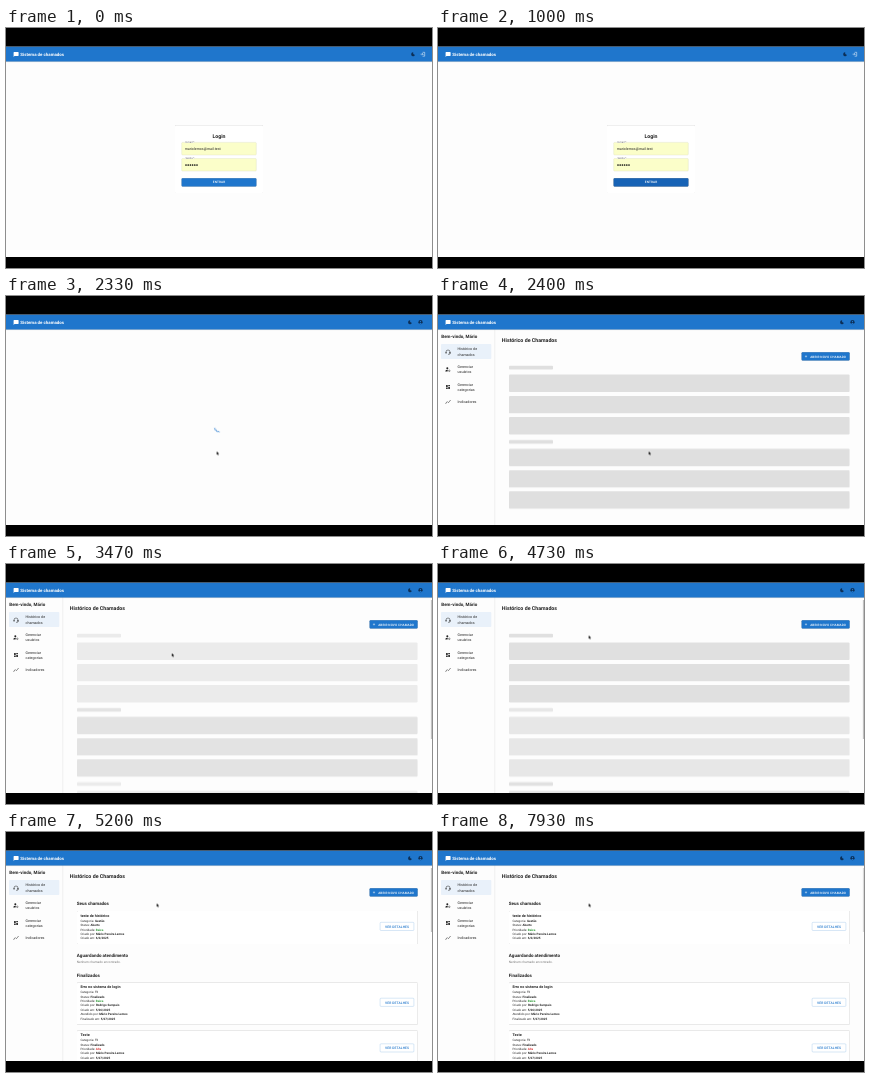
An HTML page that plays this animation: 426 by 240 pixels, repeating every 8000 ms.

```html
<!DOCTYPE html>
<html lang="pt-BR">
<head>
<meta charset="utf-8">
<title>Sistema de chamados</title>
<style>
html, body { margin: 0; width: 100%; height: 100%; overflow: hidden; background: #000; }
svg { display: block; width: 100vw; height: 100vh; font-family: Roboto, Arial, sans-serif; text-rendering: geometricPrecision; }
text { fill: #222; white-space: pre; }
.b { font-weight: 700; }
.m { font-weight: 500; letter-spacing: .0286em; }
.mid { text-anchor: middle; }
.white { fill: #fff; }
.blue { fill: #1f76cc; }
.grey { fill: #666; }
.nav text { font-size: 3.65px; }
.h6 { font-size: 4.5px; font-weight: 700; }
.line { font-size: 3.04px; }
.card { fill: #fff; filter: drop-shadow(0 .25px .4px #0005); }
.raised { filter: drop-shadow(0 .4px .4px #0006); }
.field { fill: #fbfec9; stroke: #d3d5b8; stroke-width: .3; }
.icon { fill: #222; }
.bone { fill: #000; fill-opacity: .118; }

/* One 8 s timeline: 1% = 80 ms */
.login, .logged, .wait, .home, .bones, .extra, .last, .list, .pulse, .late,
.hover, .ripple, .spin, .dash, .cursor, .bar, .thumb { animation: 8s infinite step-end; }
.login { animation-name: login; }
.logged { animation-name: logged; }
.wait { animation-name: wait; }
.home { animation-name: home; }
.bones { animation-name: bones; }
.extra { animation-name: extra; }
.last { animation-name: last; }
.list { animation-name: list; }
.pulse { animation-name: pulse; animation-timing-function: ease-in-out; }
.late { animation-name: late; animation-timing-function: ease-in-out; }
.hover { animation-name: hover; animation-timing-function: linear; }
.ripple { animation-name: ripple; animation-timing-function: ease-out; }
.spin { animation-name: spin; animation-timing-function: linear; }
.dash { animation-name: dash; animation-timing-function: ease-in-out; }
.cursor { animation-name: cursor; animation-timing-function: ease-in-out; }
.bar { animation-name: bar; animation-timing-function: linear; }
.thumb { animation-name: thumb; }

@keyframes login { 0% { visibility: visible } 25.75%, 100% { visibility: hidden } }
@keyframes logged { 0% { visibility: hidden } 25.75%, 100% { visibility: visible } }
@keyframes wait { 0% { visibility: hidden } 25.75% { visibility: visible } 30%, 100% { visibility: hidden } }
@keyframes home { 0% { visibility: hidden } 30%, 100% { visibility: visible } }
@keyframes bones { 0% { visibility: hidden } 30% { visibility: visible } 63.375%, 100% { visibility: hidden } }
@keyframes extra { 0% { visibility: hidden } 33.375% { visibility: visible } 63.375%, 100% { visibility: hidden } }
@keyframes last { 0% { transform: translateY(74.2px) } 33.375%, 100% { transform: translateY(148.4px) } }
@keyframes list { 0% { visibility: hidden } 63.375%, 100% { visibility: visible } }
@keyframes pulse { 0%, 36.25% { opacity: 1 } 48.75% { opacity: .4 } 61.25%, 100% { opacity: 1 } }
@keyframes late { 0%, 39.625% { opacity: 1 } 52.125% { opacity: .4 } 64.625%, 100% { opacity: 1 } }
@keyframes hover {
  0%, 11% { fill: #1f76cc; filter: drop-shadow(0 .3px .3px #0006) }
  12.5%, 100% { fill: #1763b6; filter: drop-shadow(0 .6px .7px #0008) }
}
@keyframes ripple {
  0%, 23.3% { transform: scale(0); opacity: 0 }
  23.375% { transform: scale(0); opacity: .1 }
  30.25%, 100% { transform: scale(1); opacity: .3 }
}
@keyframes spin { 0%, 25.75% { transform: rotate(0) } 43.25%, 100% { transform: rotate(360deg) } }
@keyframes dash {
  0%, 25.75% { stroke-dasharray: 1px, 200px; stroke-dashoffset: 0 }
  34.5%, 100% { stroke-dasharray: 100px, 200px; stroke-dashoffset: -15px }
}
@keyframes cursor {
  0%, 31.6% { transform: translate(210.6px, 155.5px); animation-timing-function: ease-in }
  33.375% { transform: translate(207px, 129px); animation-timing-function: ease-out }
  38.375%, 41.7% { transform: translate(168px, 92px) }
  48.375%, 100% { transform: translate(150.6px, 71.5px) }
}
@keyframes bar { 0%, 33.375% { opacity: 0 } 38%, 99% { opacity: 1 } 99.125%, 100% { opacity: .6 } }
@keyframes thumb { 0% { transform: scaleY(139) } 63.375%, 100% { transform: scaleY(64) } }
</style>
</head>
<body>
<svg viewBox="0 0 426 240" preserveAspectRatio="none">
  <defs>
    <linearGradient id="fade" x2="0" y2="1">
      <stop stop-color="#000" stop-opacity=".3"/><stop offset="1" stop-color="#000" stop-opacity="0"/>
    </linearGradient>
    <clipPath id="btn"><rect x="175.6" y="150.2" width="74.8" height="8.3" rx=".9"/></clipPath>
    <g id="moon"><path d="M.3-1.9A1.9 1.9 0 1 0 1.9.4 1.6 1.6 0 0 1 .3-1.9Z" fill="#0c2f57"/></g>
    <g id="group" class="bone">
      <rect x="71" y="69.8" width="44" height="3.7" rx=".8"/>
      <rect x="71" y="78.6" width="340.6" height="17.4" rx=".9"/>
      <rect x="71" y="99.9" width="340.6" height="17.4" rx=".9"/>
      <rect x="71" y="121.1" width="340.6" height="17.4" rx=".9"/>
    </g>
  </defs>

  <rect width="426" height="240" fill="#fdfdfd"/>

  <g class="login">
    <rect class="card" x="169" y="97.3" width="88" height="67.8" rx=".9"/>
    <text class="b mid" x="213" y="109.6" font-size="5.2">Login</text>
    <rect class="field" x="175.7" y="114.4" width="74.6" height="12.6" rx=".9"/>
    <rect class="field" x="175.7" y="130.5" width="74.6" height="12.6" rx=".9"/>
    <rect class="white" x="178.9" y="114" width="8.6" height=".8"/>
    <rect class="white" x="178.9" y="130.1" width="9" height=".8"/>
    <text class="grey" x="179.4" y="115.3" font-size="2.6">E-mail *</text>
    <text class="grey" x="179.4" y="131.4" font-size="2.6">Senha *</text>
    <text x="178.7" y="122.1" font-size="3.58">mariolemos@mail.test</text>
    <path d="M180 137H191.4" stroke="#111" stroke-width="1.7" stroke-linecap="round" stroke-dasharray="0 2.2"/>
    <rect class="hover" x="175.6" y="150.2" width="74.8" height="8.3" rx=".9"/>
    <g clip-path="url(#btn)"><g transform="translate(211 156)"><circle class="ripple white" r="42"/></g></g>
    <text class="m mid white" x="213" y="155.4" font-size="3.14">ENTRAR</text>
  </g>

  <g class="wait" transform="translate(213 131.5) scale(.216)">
    <g class="spin"><circle class="dash" r="20.2" fill="none" stroke="#1f76cc" stroke-width="3.8"/></g>
  </g>

  <g class="home">
    <path d="M56.8 33V229" stroke="#dedede" stroke-width=".4"/>
    <text class="h6" x="3.3" y="42.1">Bem-vindo, Mário</text>
    <rect x="3" y="48" width="50.3" height="15" rx=".9" fill="#e9f1fa"/>
    <g class="nav" id="nav"></g>
    <g class="icon">
      <path d="M8 56.6V56a2 2 0 0 1 4 0v1.6a.7.7 0 0 1-.7.7H10" fill="none" stroke="#222" stroke-width=".5"/>
      <path d="M7.6 56h.9v1.5h-.9ZM11.5 56h.9v1.5h-.9Z"/>
      <circle cx="9.3" cy="72.2" r="1"/><path d="M7.4 75.6v-.7q0-1.2 2.4-1.2l-.2 1.9Z"/>
      <circle cx="11.3" cy="74.8" r=".75" fill="none" stroke="#222" stroke-width=".5"/>
      <path d="M8.1 89h1.6v2.2H8.1ZM10.3 89h1.6v1.3h-1.6ZM8.1 91.8h1.6v1.2H8.1ZM10.3 90.9h1.6V93h-1.6Z"/>
      <path d="M7.8 107.3 9.3 105.6 10.4 106.7 12.2 104.6" fill="none" stroke="#222" stroke-width=".5"/>
      <circle cx="7.9" cy="107.2" r=".4"/><circle cx="12.1" cy="104.7" r=".4"/>
    </g>
    <text class="b" x="63.8" y="46" font-size="5.27">Histórico de Chamados</text>
    <rect class="blue raised" x="363.6" y="56.3" width="48" height="8.2" rx=".9"/>
    <path d="M366.9 60.4H369.1M368 59.3V61.5" stroke="#fff" stroke-width=".4"/>
    <text class="m white" x="372.2" y="61.5" font-size="3.14">ABRIR NOVO CHAMADO</text>
  </g>

  <g class="bones"><use class="pulse" href="#group"/></g>
  <g class="extra"><g transform="translate(0 74.2)"><use class="late" href="#group"/></g></g>
  <g class="bones"><g class="last"><use class="pulse" href="#group"/></g></g>

  <g class="list">
    <text class="h6" x="70.8" y="73.3">Seus chamados</text>
    <text class="h6" x="70.8" y="124.6">Aguardando atendimento</text>
    <text x="70.8" y="131.2" font-size="3.2" style="fill:#777">Nenhum chamado encontrado.</text>
    <text class="h6" x="70.8" y="144.7">Finalizados</text>
    <g id="tickets"></g>
  </g>

  <g class="home"><g class="bar"><g transform="translate(424.9 36)">
    <rect class="thumb" width="1.1" height="1" fill="#bdbdbd"/>
  </g></g></g>

  <rect y="33.4" width="426" height="1.2" fill="url(#fade)"/>
  <rect class="blue" y="18.5" width="426" height="15"/>
  <path class="white" d="M8 24h4.2q.4 0 .4.4v3.2q0 .4-.4.4H8.5l-.9.9V24.4q0-.4.4-.4Z"/>
  <text class="b white" x="14.3" y="27.8" font-size="4.43">Sistema de chamados</text>
  <g class="login">
    <use href="#moon" x="407" y="26.3"/>
    <path d="M416.6 24.3H418.7V28.2H416.6M414.6 26.2H417.2M416.2 25.2 417.2 26.2 416.2 27.2" fill="none" stroke="#fff" stroke-width=".5"/>
  </g>
  <g class="logged">
    <use href="#moon" x="403.9" y="26.3"/>
    <circle cx="414.5" cy="26.2" r="2.1" fill="#0c2f57"/>
    <circle class="blue" cx="414.5" cy="25.5" r=".65"/>
    <path class="blue" d="M413.2 27.4q1.3-1.1 2.6 0-1.3 1.3-2.6 0Z"/>
  </g>

  <g class="logged">
    <path class="cursor" d="M0 0V3.2L.8 2.5 1.3 3.7 1.9 3.4 1.4 2.3H2.4Z" fill="#000" stroke="#fff" stroke-width=".3" paint-order="stroke"/>
  </g>

  <path d="M0 0H426V18.5H0ZM0 229H426V240H0Z"/>
</svg>
<script>
const me = 'Mário Pereira Lemos';
const byId = id => document.getElementById(id);

const nav = [
  [54.4, 'Histórico de'], [59.6, 'chamados'],
  [72.2, 'Gerenciar'], [77.4, 'usuários'],
  [90, 'Gerenciar'], [95.2, 'categorias'],
  [107.4, 'Indicadores'],
];
byId('nav').innerHTML = nav.map(([y, s]) => `<text x="19.5" y="${y}">${s}</text>`).join('');

const tint = { Baixa: '#2e9b38', Alta: '#d63333' };

function ticket(top, height, buttonY, title, rows) {
  const lines = rows.map(([label, value], i) =>
    `<text class="line" x="74.4" y="${top + 10.7 + i * 4.43}">${label}: ` +
    `<tspan class="b" fill="${tint[value] || '#222'}">${value}</tspan></text>`);
  return `<rect class="card" x="71" y="${top}" width="340.6" height="${height}" rx=".9"/>
    <text class="b" x="74.4" y="${top + 5.8}" font-size="3.7">${title}</text>${lines.join('')}
    <rect x="374.1" y="${buttonY}" width="33.8" height="8.2" rx=".9" fill="none" stroke="#8fbae5" stroke-width=".35"/>
    <text class="m mid blue" x="391.1" y="${buttonY + 5.3}" font-size="3.3">VER DETALHES</text>`;
}

byId('tickets').innerHTML =
  ticket(79, 33, 90.3, 'teste de histórico', [
    ['Categoria', 'Gestão'], ['Status', 'Aberto'], ['Prioridade', 'Baixa'],
    ['Criado por', me], ['Criado em', '6/2/2025'],
  ]) +
  ticket(150.4, 42.2, 166.2, 'Erro no sistema de login', [
    ['Categoria', 'TI'], ['Status', 'Finalizado'], ['Prioridade', 'Baixa'],
    ['Criado por', 'Rodrigo Sampaio'], ['Criado em', '5/26/2025'],
    ['Atendido por', me], ['Finalizado em', '5/27/2025'],
  ]) +
  ticket(198.4, 42.2, 211.8, 'Teste', [
    ['Categoria', 'TI'], ['Status', 'Finalizado'], ['Prioridade', 'Alta'],
    ['Criado por', me], ['Criado em', '5/27/2025'],
  ]);

// Value colours sit on tspans, so the text rule must not win over them
document.querySelectorAll('tspan').forEach(t => { t.style.fill = t.getAttribute('fill'); });
</script>
</body>
</html>
```
